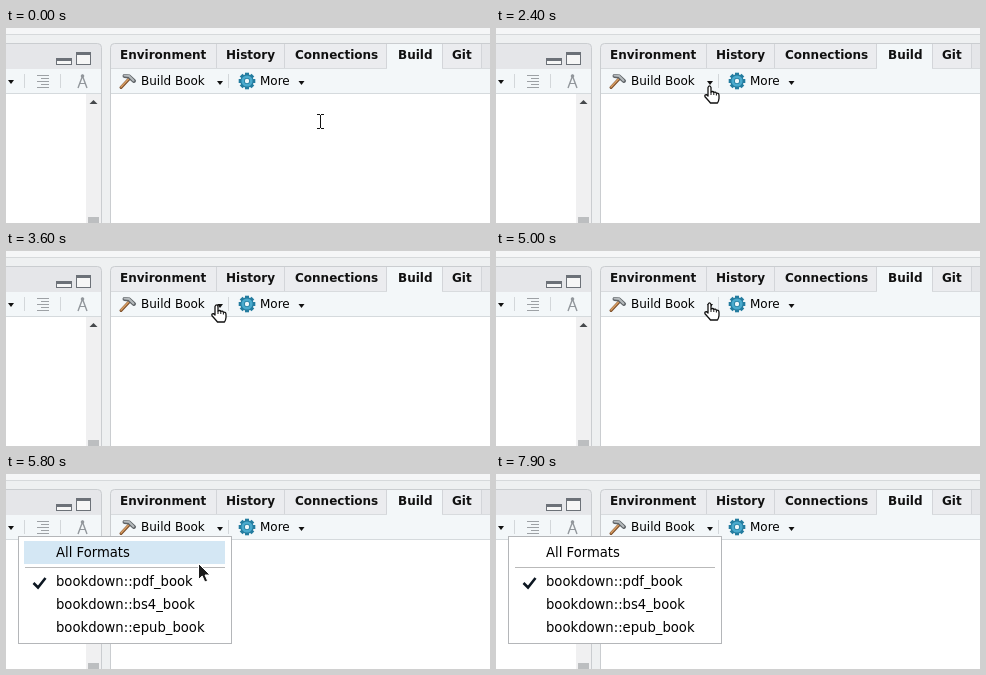
These frames come from a looping animation (484 by 195 pixels, 8.3 s). An HTML page with a canvas:

```html
<!DOCTYPE html>
<html lang="en">
<head>
<meta charset="utf-8">
<title>Build menu</title>
<style>
html, body { margin: 0; width: 100%; height: 100%; overflow: hidden; background: #eef0f1; }
canvas { display: block; }
</style>
</head>
<body>
<canvas id="stage" width="484" height="195"></canvas>
<script>
const ctx = document.getElementById('stage').getContext('2d');
const LOOP = 8300, TICK = 100;
const SANS = '"DejaVu Sans", sans-serif';
const UI = '12px ' + SANS, BOLD = 'bold 12px ' + SANS, ITEM = '13.2px ' + SANS;
const TIP = '15px "Noto Sans", "Open Sans", sans-serif';

// Pointer moves: start ms, number of ticks, shape, x, y
const moves = [
  [0, 1, 'beam', 310, 86],
  [500, 2, 'beam', 340, 72],
  [700, 3, 'arrow', 404, 27],
  [1200, 1, 'hand', 403, 23],
  [1700, 3, 'arrow', 338, 57],
  [2100, 2, 'hand', 234, 60],
  [2400, 1, 'hand', 208, 57],
  [2500, 3, 'hand', 189, 54],
  [2800, 3, 'hand', 201, 53],
  [3100, 1, 'arrow', 206, 53],
  [3600, 1, 'hand', 205, 53],
  [5000, 1, 'hand', 208, 51],
  [5200, 1, 'hand', 210, 52],
  [5500, 1, 'arrow', 211, 53],
  [5600, 5, 'arrow', 180, 113],
  [7000, 1, 'arrow', 180, 111],
  [7600, 3, 'arrow', 209, 54],
  [7900, 1, 'none', 209, 54]
];

const arrowPath = new Path2D('M.5 .5V16.5L4.2 13L6.8 19L9.6 17.8L7 12H12Z');
const handPath = new Path2D('M4 2.5Q5.5-.7 7 2.5V7Q8.8 5.8 9.8 7.4Q11.5 6.5 12.4 8.2' +
  'Q15 7.8 15 10.5V13.5Q14.8 15.8 13.5 18H6.5Q4.5 15.5 1 11.7Q.3 9.6 2.4 9.6L4 11Z');

function rect(x, y, w, h, color) {
  ctx.fillStyle = color;
  ctx.fillRect(x, y, w, h);
}

function frame(x, y, w, h, color) {
  ctx.strokeStyle = color;
  ctx.lineWidth = 1;
  ctx.strokeRect(x + .5, y + .5, w - 1, h - 1);
}

function text(str, x, y, font, color = '#000') {
  ctx.font = font;
  ctx.fillStyle = color;
  ctx.fillText(str, x, y);
}

function line(color, width, ...pts) {
  ctx.strokeStyle = color;
  ctx.lineWidth = width;
  ctx.beginPath();
  for (let i = 0; i < pts.length; i += 2) ctx.lineTo(pts[i], pts[i + 1]);
  ctx.stroke();
}

function triangle(x, y, w, h, color = '#111') {
  ctx.fillStyle = color;
  ctx.beginPath();
  ctx.moveTo(x - w / 2, y);
  ctx.lineTo(x + w / 2, y);
  ctx.lineTo(x, y + h);
  ctx.fill();
}

function disc(x, y, r, color) {
  ctx.fillStyle = color;
  ctx.beginPath();
  ctx.arc(x, y, r, 0, 7);
  ctx.fill();
}

function panel(x, w, radii) {
  ctx.beginPath();
  ctx.roundRect(x + .5, 15.5, w, 200, radii);
  ctx.fillStyle = '#e5e6e9';
  ctx.fill();
  ctx.save();
  ctx.clip();
  rect(x, 41, w + 1, 25, '#f3f7f9');
  rect(x, 65, w + 1, 1, '#d5dadd');
  rect(x, 66, w + 1, 130, '#fff');
  ctx.restore();
}

function panelEdge(x, w, radii) {
  ctx.beginPath();
  ctx.roundRect(x + .5, 15.5, w, 200, radii);
  ctx.strokeStyle = '#cacdd0';
  ctx.lineWidth = 1;
  ctx.stroke();
}

function leftPane() {
  const radii = [0, 4, 0, 0];
  panel(-10, 105, radii);
  rect(50, 30, 16, 7, '#6c7178');
  rect(51, 33, 14, 3, '#f6f6f6');
  rect(70, 24, 15, 13, '#6c7178');
  rect(71, 27, 13, 9, '#f6f6f6');
  triangle(5, 52, 6, 4);
  rect(18, 46, 1, 14, '#d3d7da');
  rect(54, 46, 1, 14, '#d3d7da');
  for (let i = 0; i < 5; i++) {
    const inset = i % 2 ? 4 : 0;
    rect(31 + inset, 47 + i * 3, 12 - inset, 1, '#9da1a5');
  }
  line('#92979c', 1.4, 72, 60, 76.5, 48, 81, 60);
  line('#92979c', 1, 73, 55.5, 80, 55.5);
  disc(76.5, 48, 1.8, '#92979c');
  rect(80, 66, 15, 129, '#f0f0f1');
  triangle(87.5, 76, 8, -4, '#45484b');
  rect(82, 189, 11, 6, '#bcbec0');
  panelEdge(-10, 105, radii);
}

function hammer() {
  ctx.lineCap = 'round';
  line('#7a4a25', 3, 115, 59.5, 123, 51);
  line('#d9a066', 1.5, 115, 59, 123, 50.6);
  line('#5d6266', 4, 118.5, 48, 123, 48.5, 128, 53);
  line('#b5babd', 2, 118.5, 47.6, 123, 48, 127.5, 52.5);
  ctx.lineCap = 'butt';
}

function gear(x, y) {
  ctx.save();
  ctx.translate(x, y);
  for (let i = 0; i < 8; i++) {
    rect(-2, -8.3, 4, 4, '#247c9f');
    ctx.rotate(Math.PI / 4);
  }
  ctx.restore();
  disc(x, y, 6.7, '#247c9f');
  disc(x, y, 5.6, '#4aaacd');
  disc(x, y, 3, '#247c9f');
  disc(x, y, 2.2, '#eef7fa');
}

function rightPane() {
  const radii = [4, 0, 0, 0];
  panel(104, 400, radii);
  const tabs = [['Environment', 114, 105], ['History', 220, 211], ['Connections', 289, 279],
    ['Build', 392, 381], ['Git', 446, 437]];
  tabs.forEach(([label, x, left], i) => {
    const right = i < 4 ? tabs[i + 1][2] : 476;
    const active = label === 'Build';
    rect(left, 16, right - left, active ? 25 : 24, active ? '#f3f7f9' : '#ebecef');
    rect(right - 1, 16, 1, 24, '#d3d5d9');
    text(label, x, 31, BOLD, '#111');
  });
  rect(105, 40, 276, 1, '#d8dbde');
  rect(436, 40, 48, 1, '#d8dbde');
  hammer();
  text('Build Book', 135, 57, UI);
  triangle(214, 53, 6, 4);
  rect(222, 46, 1, 14, '#d3d7da');
  gear(241, 53);
  text('More', 254, 57, UI);
  triangle(295.5, 53, 6, 4);
  panelEdge(104, 400, radii);
}

function tooltip() {
  ctx.save();
  ctx.shadowColor = 'rgba(0,0,0,.35)';
  ctx.shadowBlur = 10;
  ctx.shadowOffsetY = 3;
  rect(196, 72, 101, 40, '#ffffdc');
  ctx.restore();
  frame(196, 72, 101, 40, '#111');
  text('Build all', 200, 89, TIP);
  text('(Ctrl+Shift+B)', 200, 106, TIP);
}

function menu(selected) {
  rect(12, 62, 214, 108, '#fff');
  frame(12, 62, 214, 108, '#b4b6b9');
  if (selected >= 0) rect(18, selected ? 96 : 67, 201, 23, '#d4e7f4');
  rect(19, 93, 200, 1, '#b9b9b9');
  text('All Formats', 50, 83, ITEM);
  ['pdf', 'bs4', 'epub'].forEach((f, i) =>
    text(`bookdown::${f}_book`, 50, 112 + 23 * i, ITEM));
  line('#0d1722', 2.6, 27.5, 109, 32, 113.5, 39.5, 104);
}

function pointerAt(t) {
  let i = moves.length - 1;
  while (moves[i][0] > t) i--;
  const [start, ticks, shape, x, y] = moves[i];
  const [, , , px, py] = moves[Math.max(0, i - 1)];
  const p = Math.min(1, (Math.floor((t - start) / TICK) + 1) / ticks);
  return { shape, x: Math.round(px + (x - px) * p), y: Math.round(py + (y - py) * p) };
}

function drawPointer({ shape, x, y }) {
  ctx.save();
  ctx.translate(x, y);
  ctx.lineJoin = 'round';
  if (shape === 'beam') {
    rect(1, 0, 3, 1, '#111');
    rect(5, 0, 3, 1, '#111');
    rect(4, 1, 1, 13, '#111');
    rect(1, 14, 3, 1, '#111');
    rect(5, 14, 3, 1, '#111');
  } else if (shape !== 'none') {
    const arrow = shape === 'arrow';
    const path = arrow ? arrowPath : handPath;
    ctx.fillStyle = arrow ? '#1b1b1b' : '#fff';
    ctx.strokeStyle = arrow ? '#fff' : '#111';
    ctx.lineWidth = arrow ? 1 : 1.3;
    ctx.fill(path);
    ctx.stroke(path);
    if (!arrow) {
      line('#111', 1, 7, 7, 7, 10);
      line('#111', 1, 9.8, 7.5, 9.8, 10);
      line('#111', 1, 12.4, 8.2, 12.4, 10.5);
    }
  }
  ctx.restore();
}

function draw(t) {
  const pointer = pointerAt(t);
  rect(0, 0, 484, 195, '#eef0f1');
  rect(0, 0, 484, 6, '#f5f6f7');
  rect(0, 6, 484, 1, '#d6d9db');
  leftPane();
  rightPane();
  if (t >= 2900 && t < 3300) tooltip();
  if (t >= 5100) {
    const first = pointer.y > 62 || t < 6000 ? 0 : -1;
    menu(pointer.y > 93 ? 1 : first);
  }
  drawPointer(pointer);
}

const begin = performance.now();
function tick() {
  draw((performance.now() - begin) % LOOP);
  requestAnimationFrame(tick);
}
tick();
</script>
</body>
</html>
```
